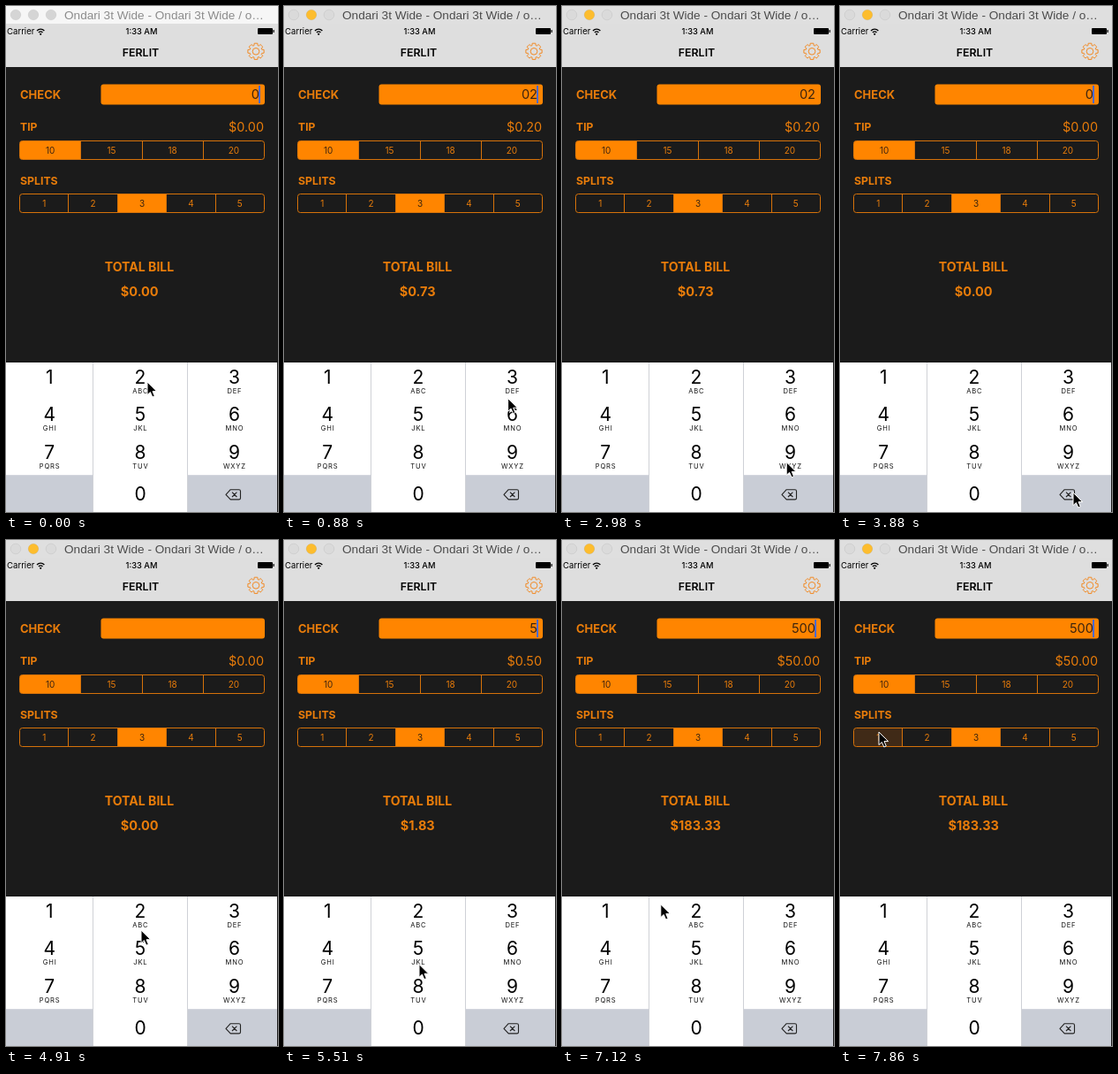
An HTML page that plays this animation: 308x572 px, repeating every 8000 ms.

```html
<!DOCTYPE html>
<html lang="en">
<head>
<meta charset="utf-8">
<title>Tip calculator</title>
<style>
  html, body { margin: 0; width: 100%; height: 100%; overflow: hidden; background: #1b1b1b; }
  svg { display: block; width: 308px; height: 572px; font-family: Inter, Roboto, sans-serif; }
  .bold { font-weight: 700; }
  .orange { fill: #e87c0a; }
  .dark { fill: #3d240e; }
  .line { fill: none; stroke: #d6720a; }
  .key { font-size: 21px; fill: #000; }
  .letters { font-size: 7.6px; letter-spacing: .8px; fill: #111; }
</style>
</head>
<body>
<svg id="stage" viewBox="0 0 308 572" xmlns="http://www.w3.org/2000/svg"></svg>
<script>
const LOOP = 8000, TICK = 148.5, FIRST_TICK = 140;
const ORANGE = '#ff8500', GREY_KEY = '#c9cdd6';

// Times in ms
const ACTIVATE = 140, SPLIT_PRESS = 7860;
const entries = [[0, '0'], [440, '02'], [3730, '0'], [4170, ''], [5360, '5'], [6110, '50'], [6680, '500']];
const presses = [[290, 440, '2'], [3730, 3880, 'del'], [4170, 4320, 'del'],
  [5210, 5360, '5'], [5960, 6110, '0'], [6390, 6680, '0']];
const caretOff = [[1030, 1480], [1930, 2380], [2830, 3280], [4620, 5060], [5810, 6110], [7130, 7580]];
const pointerPath = [[0, 160, 425], [735, 160, 425], [880, 254, 443], [1030, 232, 480], [1330, 170, 543],
  [1480, 166, 549], [1790, 166, 549], [2510, 252, 503], [2690, 252, 503], [2950, 254, 515], [3430, 262, 546],
  [3580, 264, 550], [4330, 264, 550], [4890, 153, 441], [5180, 153, 462], [5370, 153, 462],
  [5930, 153, 547], [6840, 153, 547], [7430, 66, 262], [7710, 44, 217], [8000, 44, 217]];

const text = (x, y, size, str, attrs = '', anchor = 'start') =>
  `<text x="${x}" y="${y}" font-size="${size}" text-anchor="${anchor}" ${attrs}>${str}</text>`;
const rect = (x, y, w, h, fill, attrs = '') =>
  `<rect x="${x}" y="${y}" width="${w}" height="${h}" fill="${fill}" ${attrs}/>`;

function titleBar() {
  const lights = [11, 31, 51].map((x, i) =>
    `<circle id="light${i}" cx="${x}" cy="10" r="5.8" stroke="#000" stroke-opacity=".1" stroke-width=".6"/>`).join('');
  return rect(0, 0, 308, 20, '#f6f6f6', 'id="bar"') + lights +
    text(66, 15, 13.6, 'Ondari 3t Wide - Ondari 3t Wide / o…',
      'id="caption" font-family="Liberation Sans, Arial, sans-serif"');
}

function gear(cx, cy) {
  const points = [];
  for (let i = 0; i < 8; i++) {
    for (const [offset, r] of [[-.31, 7], [-.2, 9.3], [.2, 9.3], [.31, 7]]) {
      const a = i * Math.PI / 4 + offset;
      points.push(`${(cx + r * Math.cos(a)).toFixed(2)},${(cy + r * Math.sin(a)).toFixed(2)}`);
    }
  }
  return `<g fill="none" stroke="#f28a24"><polygon points="${points.join(' ')}" stroke-linejoin="round"/>
    <circle cx="${cx}" cy="${cy}" r="3.8"/></g>`;
}

function header() {
  return rect(0, 20, 308, 49, '#dedede') +
    text(1, 32, 9.6, 'Carrier') +
    `<g fill="none" stroke="#000" stroke-width="1.3">
      <path d="M35 28a5.8 5.8 0 0 1 8.4 0M36.9 30a3.3 3.3 0 0 1 4.6 0"/></g>
      <circle cx="39.2" cy="31.8" r="1.1"/>` +
    text(153.5, 32, 9.3, '1:33 AM', 'font-weight="500"', 'middle') +
    rect(285, 25, 17, 7, '#000', 'rx="1"') + rect(302.5, 27, 1.2, 3, '#000') +
    text(152.5, 57, 12.4, 'FERLIT', 'font-weight="600"', 'middle') + gear(283, 51.3);
}

function segments(y, labels, selected, id) {
  const left = 15.5, width = 277, height = 21, w = width / labels.length;
  // Dividers sit on whole pixels
  const edge = i => Math.floor(left + i * w) + .5;
  const cells = labels.map((label, i) => {
    const on = i === selected;
    return rect(edge(i), y, edge(i + 1) - edge(i), height, on ? ORANGE : 'none', `id="${id}${i}"`) +
      text(left + (i + .5) * w, y + 14.2, 10, label, `class="${on ? 'dark' : 'orange'}"`, 'middle');
  }).join('');
  const dividers = labels.slice(1).map((_, i) => `M${edge(i + 1)} ${y}v${height}`).join('');
  return `<clipPath id="clip${id}">${rect(left, y, width, height, '#000', 'rx="3"')}</clipPath>
    <g clip-path="url(#clip${id})">${cells}<path class="line" d="${dividers}"/></g>` +
    rect(left, y, width, height, 'none', 'rx="3" stroke="#d6720a"');
}

function form() {
  const label = (y, size, str) => text(16, y, size, str, 'class="bold orange"');
  return rect(0, 69, 308, 503, '#1b1b1b') +
    label(105, 13, 'CHECK') + rect(107.5, 88.5, 185.5, 23, ORANGE, 'rx="3"') +
    text(287, 105, 14.6, '', 'id="check" class="dark"', 'end') +
    rect(286, 90, 2, 20, '#4a6ad0', 'id="caret"') +
    label(141, 12.2, 'TIP') + text(292, 141.5, 14.4, '', 'id="tip" class="orange"', 'end') +
    segments(152.5, ['10', '15', '18', '20'], 0, 'rate') +
    label(202, 12.3, 'SPLITS') + segments(212.5, ['1', '2', '3', '4', '5'], 2, 'split') +
    text(151, 300, 14.1, 'TOTAL BILL', 'class="bold orange"', 'middle') +
    text(151.2, 328.3, 14.5, '', 'id="total" class="bold orange"', 'middle');
}

function keypad() {
  const letters = ['', 'ABC', 'DEF', 'GHI', 'JKL', 'MNO', 'PQRS', 'TUV', 'WXYZ'];
  const left = [0, 99, 206], width = [98, 106, 101], center = [49.2, 152, 258.5];
  const keyRect = (col, row, name, fill) =>
    rect(left[col], 403 + row * 42.4, width[col], 42.4, fill, `id="key-${name}"`);
  let out = rect(0, 403, 307, 169, '#fff');
  letters.forEach((str, i) => {
    const col = i % 3, row = Math.floor(i / 3), y = 427 + row * 42.4;
    out += keyRect(col, row, i + 1, '#fff') +
      text(center[col], y, 21, i + 1, 'class="key"', 'middle') +
      text(center[col] + .4, y + 11, 7.6, str, 'class="letters"', 'middle');
  });
  return out + keyRect(0, 3, 'blank', GREY_KEY) + keyRect(1, 3, '0', '#fff') + keyRect(2, 3, 'del', GREY_KEY) +
    text(152, 559, 21, '0', 'class="key"', 'middle') +
    rect(98, 403, 1, 169, '#cfd1d6') + rect(205, 403, 1, 169, '#cfd1d6') +
    `<path d="M249 552.3l5.2-5.6h9.6q1.7 0 1.7 1.7v7.8q0 1.7-1.7 1.7h-9.6zM256 549.6l5.4 5.4m0-5.4l-5.4 5.4"
      fill="none" stroke="#222" stroke-width="1.1" stroke-linejoin="round"/>`;
}

const pointer = `<path id="pointer" d="M0 0V14.6L3.4 11.5 5.8 17 8.3 16 6 10.6H10.7Z"
  fill="#000" stroke="#fff" stroke-width="1" stroke-linejoin="round"/>`;

document.getElementById('stage').innerHTML = titleBar() + header() + form() + keypad() + pointer;

const $ = id => document.getElementById(id);
const fill = (id, color) => $(id).setAttribute('fill', color);
const within = (t, [from, to]) => t >= from && t < to;
const money = value => '$' + value.toFixed(2);

function pointerAt(time) {
  // The pointer is sampled in steps, like a screen recording
  const t = time < FIRST_TICK ? 0 : FIRST_TICK + Math.floor((time - FIRST_TICK) / TICK + .03) * TICK;
  const next = pointerPath.findIndex(p => p[0] > t);
  const [t0, x0, y0] = pointerPath[next - 1], [t1, x1, y1] = pointerPath[next];
  const k = (t - t0) / (t1 - t0);
  return [x0 + (x1 - x0) * k, y0 + (y1 - y0) * k];
}

function render(t) {
  const active = t >= ACTIVATE;
  fill('bar', active ? '#dfdfdf' : '#f6f6f6');
  fill('caption', active ? '#4c4c4c' : '#8c8c8c');
  fill('light0', active ? '#dadada' : '#d5d5d5');
  fill('light1', active ? '#fdbd2e' : '#d5d5d5');
  fill('light2', active ? '#dadada' : '#d5d5d5');

  const check = entries.filter(e => e[0] <= t).pop()[1];
  const amount = Number(check);
  $('check').textContent = check;
  $('tip').textContent = money(amount * .1);
  $('total').textContent = money(amount * 1.1 / 3);
  $('caret').setAttribute('visibility', caretOff.some(span => within(t, span)) ? 'hidden' : 'visible');

  for (const key of ['2', '5', '0', 'del']) {
    const down = presses.some(p => p[2] === key && within(t, p));
    fill('key-' + key, down !== (key === 'del') ? GREY_KEY : '#fff');
  }
  fill('split0', t >= SPLIT_PRESS ? '#402a17' : 'none');
  $('pointer').setAttribute('transform', `translate(${pointerAt(t)})`);
}

function frame() {
  render(performance.now() % LOOP);
  requestAnimationFrame(frame);
}
frame();
</script>
</body>
</html>
```
